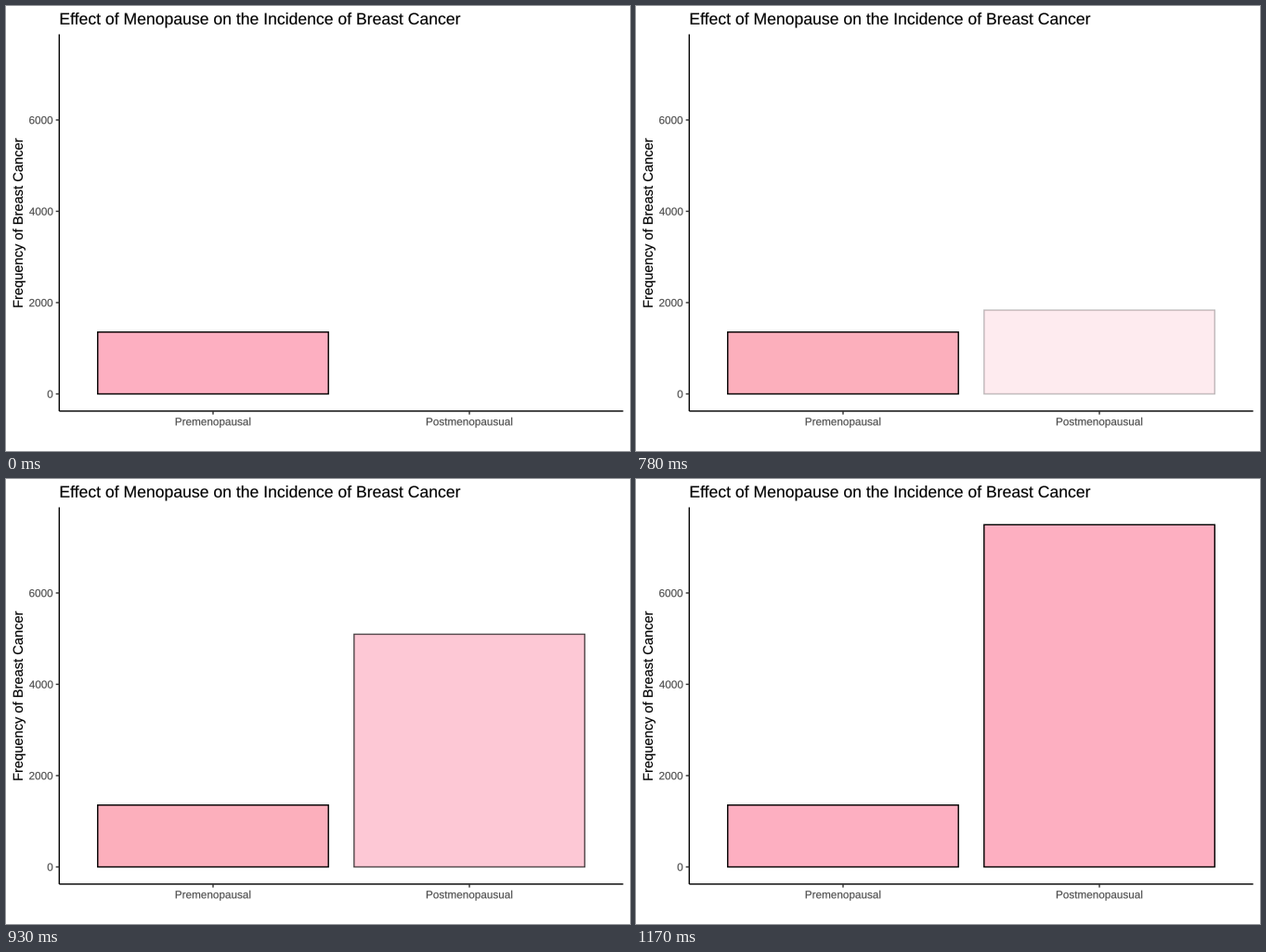
These frames come from a looping animation (672x480 px, 1.8 s). A matplotlib script:

```python
import matplotlib.pyplot as plt
from matplotlib.animation import FuncAnimation
from matplotlib.patches import PathPatch, Rectangle
from matplotlib.textpath import TextPath
from matplotlib.transforms import Affine2D

W, H, DPI = 672, 480, 96
FRAMES, INTERVAL = 60, 30
START, SPAN, FIRST_VISIBLE = 19, 20, 23

LEFT, RIGHT, TOP, BOTTOM = 57.35, 664.67, 30.5, 436.95
ZERO, PX_PER_CASE = 418.45, 98.5 / 2000
UNIT = (RIGHT - LEFT) / 2.2
PX = 72 / DPI
LINE = 1.42 * PX
TICK = 3.67

PINK, PINK_MOVING = "#fdafc1", "#fcafbc"
PRE, POST = 1355, 7495

fig = plt.figure(figsize=(W / DPI, H / DPI), dpi=DPI, facecolor="white")
ax = fig.add_axes([0, 0, 1, 1])
ax.set_xlim(0, W)
ax.set_ylim(H, 0)
ax.axis("off")


def x_pos(category):
    return LEFT + (category - 0.4) * UNIT


def y_pos(cases):
    return ZERO - cases * PX_PER_CASE


def line(xs, ys, color="black"):
    ax.plot(xs, ys, color=color, lw=LINE, solid_capstyle="butt", snap=False)


def label(x, y, text, size, color="black", align=0.5, rotation=0):
    """Outlined text on a sub-pixel baseline; align 0 left, 1 right."""
    path = TextPath((0, 0), text, size=size, prop={"family": "Liberation Sans"})
    box = path.get_extents()
    place = (Affine2D().translate(-align * (box.x0 + box.x1), 0)
             .rotate_deg(rotation).scale(1, -1).translate(x, y))
    ax.add_patch(PathPatch(place.transform_path(path), facecolor=color,
                           edgecolor=color, lw=0.15 * PX, snap=False))


def add_bar(category, cases):
    bar = Rectangle((x_pos(category - 0.45), ZERO), 0.9 * UNIT,
                    -cases * PX_PER_CASE, facecolor=PINK, edgecolor="black",
                    lw=LINE, snap=False, zorder=1)
    return ax.add_patch(bar)


def ease_quad(t):
    t = min(max(t, 0), 1)
    return 2 * t * t if t < 0.5 else 1 - 2 * (1 - t) ** 2


pre_bar = add_bar(1, PRE)
post_bar = add_bar(2, POST)

# Axes, ticks and labels
line([LEFT, LEFT], [TOP, BOTTOM])
line([LEFT, RIGHT], [BOTTOM, BOTTOM])
for cases in range(0, 6001, 2000):
    y = y_pos(cases)
    line([LEFT - TICK, LEFT], [y, y], "#333333")
    label(LEFT - 6.6, y + 4.2, str(cases), 11.73, "#4d4d4d", align=1)
for category, name in enumerate(["Premenopausal", "Postmenopausual"], 1):
    x = x_pos(category)
    line([x, x], [BOTTOM, BOTTOM + TICK], "#333333")
    label(x, 452.3, name, 11.73, "#4d4d4d")

label(LEFT, 19.8, "Effect of Menopause on the Incidence of Breast Cancer",
      17.6, align=0)
label(17.9, (TOP + BOTTOM) / 2, "Frequency of Breast Cancer", 14.67,
      rotation=90)


def update(frame):
    grown = ease_quad((frame - START) / SPAN)
    moving = START < frame < START + SPAN
    pre_bar.set_facecolor(PINK_MOVING if moving else PINK)
    post_bar.set_visible(frame >= FIRST_VISIBLE)
    post_bar.set_height(-POST * PX_PER_CASE * grown)
    post_bar.set_alpha(grown)
    return pre_bar, post_bar


anim = FuncAnimation(fig, update, frames=FRAMES, interval=INTERVAL,
                     repeat=True, repeat_delay=0)
plt.show()
```
